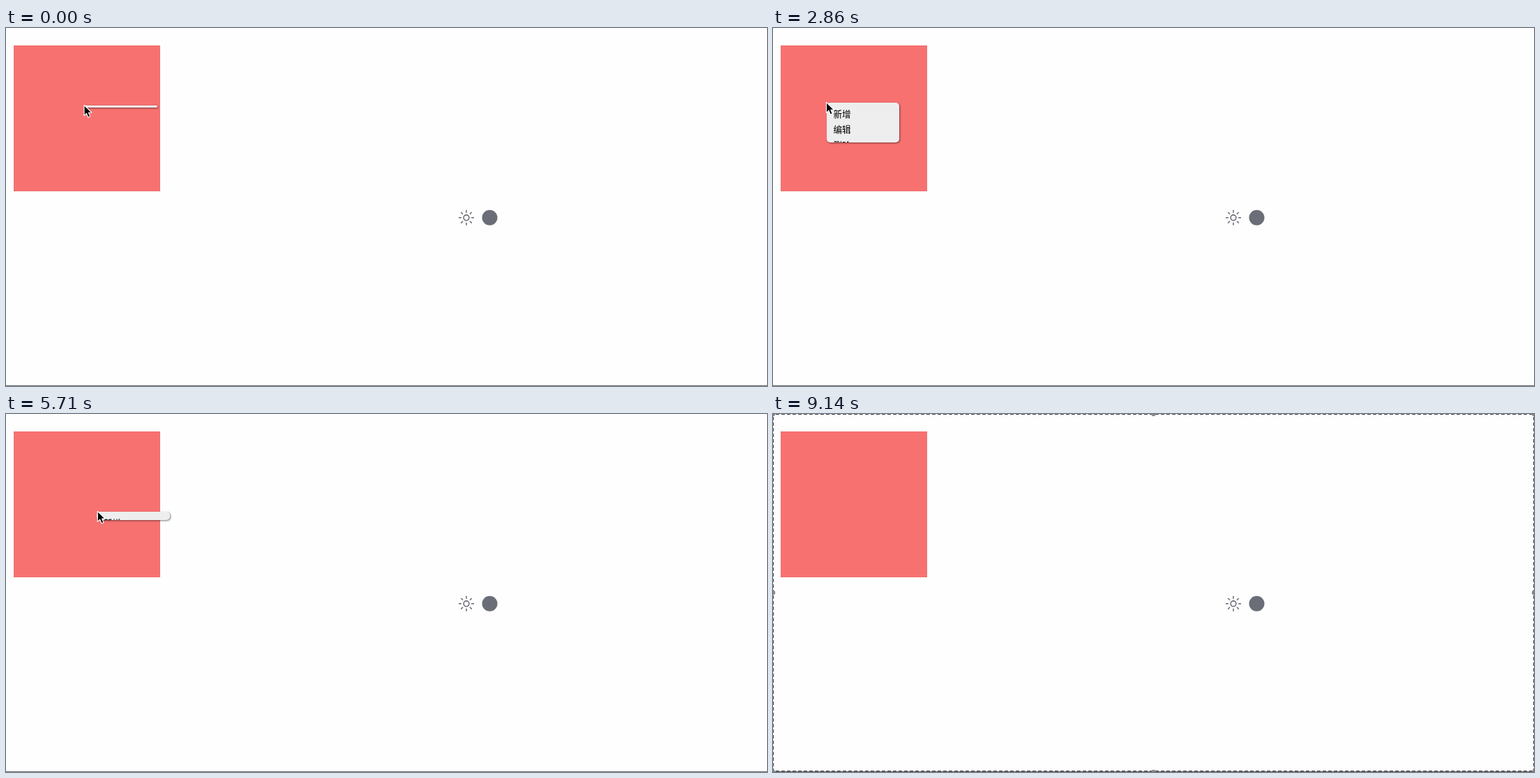
An HTML page that plays this animation: 1091 by 513 pixels, repeating every 9.9 s.

```html
<!DOCTYPE html>
<html lang="zh-CN">
<head>
<meta charset="utf-8">
<title>Context menu</title>
<style>
html, body { margin: 0; width: 100%; height: 100%; overflow: hidden; background: #fefefe; }
svg { position: absolute; left: 0; top: 0; }
#menu {
  position: absolute; width: 104.5px; overflow: hidden; border-radius: 5px;
  background: #eee; box-shadow: 1px 1px 2.5px rgba(0, 0, 0, .5);
  font: 12.6px/22.4px "Noto Sans CJK SC", "Noto Sans CJK", sans-serif; color: #000;
}
#list { padding: 5px; }
#list div { height: 22.4px; padding-left: 5px; border-radius: 4px; white-space: nowrap; }
#list .on { background: #3277dc; color: #fff; }
</style>
</head>
<body>
<svg width="1091" height="513">
  <rect x="11.5" y="25.5" width="209" height="208" fill="#f87171" stroke="#ec716f"/>
  <g id="sun" transform="translate(660 271.8) scale(.785)" fill="none" stroke="#6b6e77" stroke-width="2">
    <circle r="5"/>
  </g>
  <circle cx="693.5" cy="271.8" r="11" fill="#6b6e77"/>
  <path d="M0 512.5H1091" stroke="#666"/>
  <g id="frame">
    <path d="M0 .5H1091M0 511.5H1091M.5 0V513M1090.5 0V513" stroke="#444" stroke-dasharray="5 3" stroke-dashoffset="4"/>
  </g>
</svg>
<div id="menu"><div id="list"><div>新增</div><div>编辑</div><div>删除</div></div></div>
<svg width="1091" height="513">
  <g id="cursor" stroke-linejoin="round">
    <path id="arrow" d="M0 0V15L3.4 11.8L5.8 17.4L8.7 16.2L6.3 10.7H10.8Z" stroke="#fff" stroke-width="1.1"/>
    <path id="hand" d="M-1.5 1.5Q0-1 1.6 1.5L3 6.2Q5 4.8 6.2 6.4Q8 5.4 9 7Q11.5 6.5 11.8 9Q12.2 13.5 10 17.5H2.5Q1 14.5-3.5 11.5Q-4-1.5 9.2 1.2 10.5Z" fill="#fff" stroke="#000" stroke-width="1.2"/>
  </g>
</svg>
<script>
const LOOP = 9900, STEP = 1000 / 7, OPEN_MS = 400, GLIDE_MS = 600;
const FULL = 78, WIDTH = 104.5, ROW = 22.4, PAD = 5;
const FRAME_AT = 8560, HIDE_AT = 9140;
const $ = id => document.getElementById(id);
const menu = $('menu'), items = [...$('list').children];

// Where the pointer arrives, when, and what its click does there
const stop = (at, x, y, click) => ({ at, x, y, click });
const stops = [
  stop(-8, 112, 110.5, 'open'),
  stop(1857, 135, 135),
  stop(2200, 136, 174, 'close'),
  stop(2665, 76.5, 106.5, 'open'),
  stop(3500, 100, 140),
  stop(4217, 176.5, 98.5, 'open'),
  stop(5000, 138, 251),
  stop(5280, 138, 251, 'close'),
  stop(5682, 130, 139.5, 'open'),
  stop(6286, 323, 121.5),
  stop(6560, 323, 121.5, 'close'),
  stop(8860, 323, 121.5),
  stop(9000, 381, 473)
];

function add(parent, tag, attrs) {
  const el = document.createElementNS('http://www.w3.org/2000/svg', tag);
  for (const k in attrs) el.setAttribute(k, attrs[k]);
  parent.append(el);
}
for (let a = 0; a < 360; a += 45)
  add($('sun'), 'path', { d: 'M0-9V-14', transform: `rotate(${a})` });
for (const x of [0, 545.5, 1091])
  for (const y of [0, 256, 513])
    if (x !== 545.5 || y !== 256) add($('frame'), 'circle', { cx: x, cy: y, r: 3.2, fill: '#888' });

const show = (el, on) => el.style.display = on ? '' : 'none';

// Rest at each stop, then glide so as to reach the next one on time
function pointer(t) {
  const from = stops.findLast(s => s.at <= t);
  const to = stops.find(s => s.at > t) || from;
  const span = Math.min(GLIDE_MS, to.at - from.at) || 1;
  const p = Math.max(0, 1 - (to.at - t) / span);
  const f = to === from ? 0 : p * p * (3 - 2 * p);
  return [from.x + (to.x - from.x) * f, from.y + (to.y - from.y) * f];
}

function draw() {
  // Time advances seven steps a second
  const t = Math.floor((performance.now() % LOOP + 5) / STEP) * STEP;
  const [x, y] = pointer(t);
  const last = stops.findLast(s => s.click && s.at <= t);
  const open = last.click === 'open';
  let hover = -1;
  show(menu, open);
  if (open) {
    const p = Math.min(1, (t - last.at) / OPEN_MS);
    const height = FULL * p * (2 - p);
    menu.style.left = last.x + 'px';
    menu.style.top = last.y + .5 + 'px';
    menu.style.height = height + 'px';
    const inside = x > last.x + PAD && x < last.x + WIDTH - PAD && y < last.y + height;
    if (inside) hover = Math.floor((y - last.y - PAD) / ROW);
  }
  items.forEach((el, i) => el.className = i === hover ? 'on' : '');
  const overItem = hover in items;
  show($('arrow'), !overItem);
  show($('hand'), overItem);
  show($('cursor'), t < HIDE_AT);
  $('cursor').setAttribute('transform', `translate(${x} ${y})`);
  show($('frame'), t > FRAME_AT);
  requestAnimationFrame(draw);
}
draw();
</script>
</body>
</html>
```
